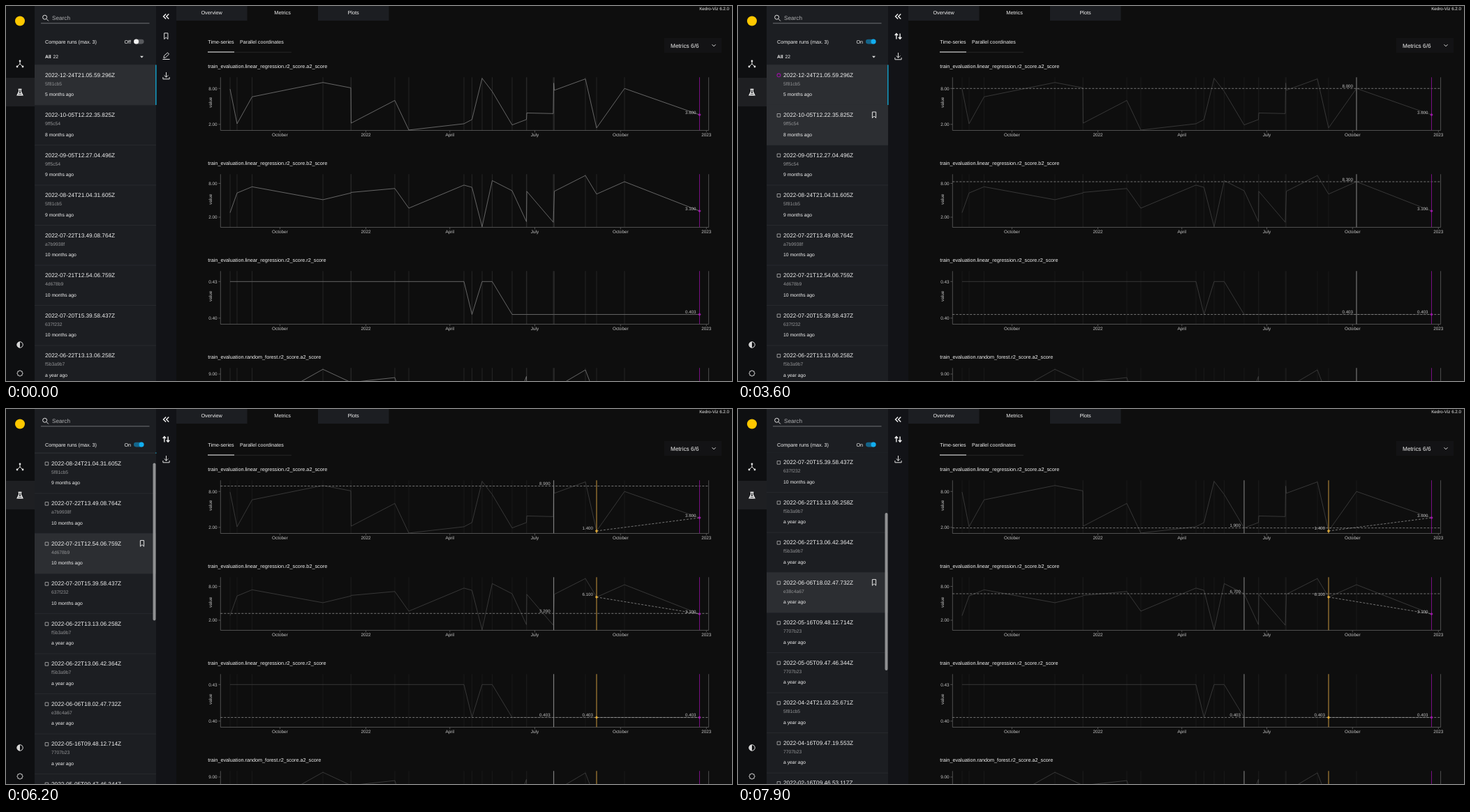
These frames come from a looping animation (1040 by 538 pixels, 8000 ms). An HTML page:

```html
<!DOCTYPE html>
<html lang="en">
<head>
<meta charset="utf-8">
<title>Experiment runs</title>
<style>
html, body { margin: 0; width: 100%; height: 100%; overflow: hidden; background: #0e0e0e; }
svg { display: block; width: 100vw; height: 100vh; }
text { font-family: "Liberation Sans", Arial, sans-serif; text-rendering: geometricPrecision; fill: #f2f2f2; }
.icon { fill: none; stroke: #e2e2e2; stroke-width: 1; }
.icon.bold { stroke: #f4f4f4; stroke-width: 1.35; }
.axis { fill: none; stroke: #606060; stroke-width: .8; }
.tick { font-size: 6.4px; fill: #c4c4c4; }
.value { font-size: 6.2px; fill: #c0c0c0; text-anchor: end; }
.trend { fill: none; stroke: #7c7c7c; stroke-width: .8; }
.run { stroke: #2d2d2d; stroke-width: .8; }
.dim .trend { stroke: #424242; }
.dim .run { stroke: #1c1c1c; }
.dash { fill: none; stroke: #a0a0a0; stroke-width: .7; stroke-dasharray: 3 2; }
</style>
</head>
<body>
<svg id="stage" viewBox="0 0 1040 538" xmlns="http://www.w3.org/2000/svg"></svg>
<script>
const LOOP = 8000, ROW = 57.5, LIST_TOP = 84.5;
const PURPLE = '#780e83', YELLOW = '#c4933a', GREY = '#858585';

const runs = `2022-12-24T21.05.59.296Z 5f81cb5 5 months
2022-10-05T12.22.35.825Z 9ff5c54 8 months
2022-09-05T12.27.04.496Z 9ff5c54 9 months
2022-08-24T21.04.31.605Z 5f81cb5 9 months
2022-07-22T13.49.08.764Z a7b9938f 10 months
2022-07-21T12.54.06.759Z 4d678b9 10 months
2022-07-20T15.39.58.437Z 637f232 10 months
2022-06-22T13.13.06.258Z f5b3a9b7 a year
2022-06-22T13.06.42.364Z f5b3a9b7 a year
2022-06-06T18.02.47.732Z e38c4a67 a year
2022-05-16T09.48.12.714Z 7707b23 a year
2022-05-05T09.47.46.344Z 7707b23 a year
2022-04-24T21.03.25.671Z 5f81cb5 a year
2022-04-16T09.47.19.553Z 7707b23 a year
2022-02-16T09.46.53.117Z 7707b23 a year`.split('\n').map(line => {
  const [name, hash, ...age] = line.split(' ');
  return { name, hash, age: age.join(' ') + ' ago' };
});

// Run positions on the time axis, oldest first.
const xs = [321, 331, 352.5, 454, 494, 494.4, 557, 577, 656, 667.5, 682,
  696.5, 725, 745.5, 746, 784, 784.6, 785.5, 830, 846, 886, 993.5];
const last = xs.length - 1;
const SECOND_ROW = 2;

// ticks: [label, y offset from the top of the plot]
const charts = [
  { title: 'linear_regression.r2_score.a2_score', ticks: [['8.00', 16], ['2.00', 67.5]], base: 8, unit: 8.58,
    data: [7.9, 2.1, 6.6, 9, 8.1, 2.2, 6, 1.05, 2.1, 2.8, 9.7, 7.5, 1.9, 2.8, 3.9, 3.8, 8.9, 7.7, 9.6, 1.4, 8, 3.6] },
  { title: 'linear_regression.r2_score.b2_score', ticks: [['8.00', 13.2], ['2.00', 61.7]], base: 8, unit: 8.08,
    data: [2.8, 6.3, 7.4, 5.1, 6.3, 6.4, 7.1, 3.6, 7.7, 7.3, .3, 8.5, 6.7, 1.2, 6.6, 1.1, 3.2, 6.6, 9.4, 6.1, 8.3, 3.1] },
  { title: 'linear_regression.r2_score.r2_score', ticks: [['0.43', 15], ['0.40', 67.5]], base: .43, unit: 1750,
    data: xs.map((x, i) => i < 9 || i === 10 || i === 11 ? .43 : .403) },
  { title: 'random_forest.r2_score.a2_score', ticks: [['9.00', 8.7]], base: 9, unit: 8.5,
    data: [2, 2.5, 3.1, 9.8, 7.6, 7.6, 8.4, 1, 2, 3, 4, 5, 2, 8.6, 2, 3, 3, 6.6, 9.7, 4.7, 4, 3] }
];
charts.forEach((c, i) => {
  c.top = 102.3 + 139 * i;
  c.y = k => c.top + c.ticks[0][1] + (c.base - c.data[k]) * c.unit;
});

const text = (x, y, size, str, attrs = '') => `<text x="${x}" y="${y}" font-size="${size}" ${attrs}>${str}</text>`;
const rect = (x, y, w, h, fill, attrs = '') => `<rect x="${x}" y="${y}" width="${w}" height="${h}" fill="${fill}" ${attrs}/>`;
const line = (x1, y1, x2, y2, attrs) => `<line x1="${x1}" y1="${y1}" x2="${x2}" y2="${y2}" ${attrs}/>`;
const icon = (x, y, d, kind = '') => `<path class="icon ${kind}" transform="translate(${x} ${y})" d="${d}"/>`;

const BOOKMARK = 'M-2.6-4.3H2.6V4.3L0 1.8L-2.6 4.3Z';
const DOWNLOAD = 'M0-5V2.2M-2.8-.6L0 2.2L2.8-.6M-4.6 2V4.8H4.6V2';
const SORT = 'M-2.6 4V-3.6M-4.8-1.4L-2.6-3.8L-.4-1.4M2.6-4V3.6M.4 1.4L2.6 3.8L4.8 1.4';
const PENCIL = 'M-3.6 3L-3-.2L2-4.6L4-2.4L-1 2.4ZM-5 5H5';
const CHEVRONS = 'M-.4-3.6L-4 0L-.4 3.6M3.8-3.6L.2 0L3.8 3.6';
const GEAR = 'M0-4.2L1.4-3.2L3-3L3.2-1.4L4.2 0L3.2 1.4L3 3L1.4 3.2L0 4.2L-1.4 3.2L-3 3L-3.2 1.4L-4.2 0L-3.2-1.4L-3-3L-1.4-3.2Z';

function navBar() {
  return rect(0, 0, 41, 538, '#0e0f11') + rect(0, 103, 41, 41, '#1e1f22') +
    `<circle cx="20" cy="21.5" r="7" fill="#ffc800"/>` +
    icon(20, 83, 'M0-3V0L-3.6 3.6M0 0L3.6 3.6') +
    [[20, 79], [16, 87], [24, 87]].map(([x, y]) => `<circle cx="${x}" cy="${y}" r="1.4" fill="#e2e2e2"/>`).join('') +
    icon(20, 123.5, 'M-2.4-4.2H2.4M-1.3-4V-.8L-3.8 4.2H3.8L1.3-.8V-4M-2.6 2H2.6', 'bold') +
    `<circle class="icon" cx="20" cy="486" r="4.2"/><path d="M20 481.8A4.2 4.2 0 0 0 20 490.2Z" fill="#d8d8d8"/>` +
    icon(20, 527, GEAR);
}

function runRow(run, i) {
  const y = LIST_TOP + ROW * i;
  return `<g class="row">` +
    rect(41, y, 174, ROW, '#2c2e32', 'class="bg"') +
    line(41, y + ROW, 215, y + ROW, 'stroke="#2a2c30" stroke-width=".8"') +
    rect(214, y, 1.6, ROW, '#1593b8', 'class="bar"') +
    `<g class="label">` + text(56, y + 17.2, 8.22, run.name) +
    text(56, y + 29.4, 6.75, run.hash, 'style="fill:#939496"') +
    text(56, y + 44.7, 6.77, run.age) + `</g>` +
    `<path class="box" transform="translate(58.4 ${y + 14.8})" d="M-2.3-2.3H2.3V2.3H-2.3Z" fill="none" stroke="#b5b5b5" stroke-width=".8"/>` +
    `<circle class="mark" cx="58.4" cy="${y + 14.8}" r="2.4" fill="none" stroke-width="1.1" stroke="${i ? '#e8b422' : '#96129f'}"/>` +
    icon(195, y + 14.3, BOOKMARK, 'save') + `</g>`;
}

function sidePanel() {
  return rect(41, 0, 174, 538, '#1c1e22') +
    `<circle class="icon" cx="55.6" cy="16.2" r="3"/>` + icon(59.4, 20, 'M-1.5-1.5L1.5 1.5') +
    text(66, 20.4, 8.2, 'Search', 'style="fill:#b0b1b3"') +
    line(50, 24.8, 205.5, 24.8, 'stroke="#85868a" stroke-width=".8"') +
    text(56, 53.6, 7.2, 'Compare runs (max. 3)') +
    text(179, 53.6, 7.2, 'Off', 'id="state" text-anchor="end"') +
    rect(183, 47.8, 14.6, 6.6, '#57595d', 'id="track" rx="3.3"') +
    `<circle id="knob" cy="51.1" r="3.5"/>` +
    `<g clip-path="url(#listClip)"><g id="list">` +
    text(56, 75.4, 6.8, 'All', 'font-weight="bold"') + text(67.5, 75.4, 6.7, '22') +
    `<path d="M192 71.8H197L194.5 74.4Z" fill="#ddd"/>` +
    line(41, LIST_TOP, 215, LIST_TOP, 'stroke="#2a2c30" stroke-width=".8"') +
    runs.map(runRow).join('') + `</g></g>`;
}

function actionBar() {
  return rect(215, 0, 29, 538, '#121317') + icon(229.5, 15, CHEVRONS, 'bold') +
    `<g id="single">` + icon(229.3, 43.2, BOOKMARK) + icon(229.5, 71.5, PENCIL) + icon(229.5, 100, DOWNLOAD) + `</g>` +
    `<g id="compare">` + icon(229.5, 43.4, SORT, 'bold') + icon(229.5, 72, DOWNLOAD) + `</g>`;
}

function header() {
  const tab = (x, label, on) => (on ? '' : rect(x, 0, 101.5, 21, '#1c1e22')) +
    text(x + 50.6, 12.2, 7.3, label, 'text-anchor="middle"');
  return tab(244, 'Overview') + tab(345.5, 'Metrics', true) + tab(447, 'Plots') +
    text(1036, 5.6, 6.24, 'Kedro-Viz 6.2.0', 'text-anchor="end"') +
    text(289.3, 54, 7.2, 'Time-series') + text(335, 54, 7.17, 'Parallel coordinates') +
    line(289, 66.3, 409, 66.3, 'stroke="#2b2b2b" stroke-width=".8"') +
    line(289, 66, 327, 66, 'stroke="#eee" stroke-width="1.2"') +
    rect(943, 46, 82, 21, '#131315') + text(952, 59.6, 8.3, 'Metrics 6/6') +
    icon(1014, 56.5, 'M-2.5-1.2L0 1.3L2.5-1.2');
}

// Vertical line, point and value label of a picked run.
function picked(c, k, color, point) {
  const x = xs[k], y = c.y(k);
  return line(x, c.top, x, c.top + 76, `stroke="${color}" stroke-width="1"`) +
    (point ? `<path d="M${x - 2.2} ${y}L${x} ${y - 2.2}L${x + 2.2} ${y}L${x} ${y + 2.2}Z" fill="${point}"/>` : '') +
    `<text class="value" x="${x - 5}" y="${y - 1.5}">${c.data[k].toFixed(3)}</text>`;
}

function chart(c) {
  const { top } = c, bottom = top + 76.2, k = last - SECOND_ROW;
  const months = [['October', 392.4], ['2022', 515.5], ['April', 635.8], ['July', 757.5], ['October', 880.3], ['2023', 1003.3]];
  return text(289.3, top - 12.9, 7.26, 'train_evaluation.' + c.title) +
    xs.map(x => line(x, top, x, bottom, 'class="run"')).join('') +
    `<path class="axis" d="M307.3 ${top}V${bottom}H1006.6V${top}"/>` +
    c.ticks.map(([label, dy]) => line(304.3, top + dy, 307.3, top + dy, 'class="axis"') +
      text(302.6, top + dy + 2.3, 6.4, label, 'class="tick" text-anchor="end"')).join('') +
    months.map(([label, x]) => line(x, bottom, x, bottom + 3, 'class="axis"') +
      text(x, top + 85, 6.4, label, 'class="tick" text-anchor="middle"')).join('') +
    `<text class="tick" text-anchor="middle" transform="translate(295 ${top + 36}) rotate(-90)">value</text>` +
    `<polyline class="trend" points="${xs.map((x, j) => x + ',' + c.y(j)).join(' ')}"/>` +
    `<g class="hover"></g><g class="second">` +
    `<path class="dash" d="M${xs[k]} ${c.y(k)}L${xs[last]} ${c.y(last)}"/>` +
    picked(c, k, YELLOW, '#dca838') + `</g>` + picked(c, last, PURPLE, '#9a18a6');
}

const stage = document.getElementById('stage');
stage.innerHTML = `<defs><clipPath id="listClip"><rect x="41" y="62.5" width="176" height="476"/></clipPath></defs>` +
  rect(0, 0, 1040, 538, '#0e0e0e') + navBar() + actionBar() + sidePanel() + header() +
  `<g id="charts">${charts.map(chart).join('')}</g>` +
  rect(210.5, 0, 4, 226, '#8f9092', 'id="thumb" rx="2"');

const $ = id => document.getElementById(id);
const all = sel => [...stage.querySelectorAll(sel)];
const show = (el, on) => el.setAttribute('visibility', on ? 'visible' : 'hidden');
const rows = all('.row').map(el => Object.fromEntries(
  ['bg', 'bar', 'label', 'box', 'mark', 'save'].map(name => [name, el.querySelector('.' + name)])));
const hoverLayers = all('.hover'), secondLayers = all('.second');

const clamp = v => Math.max(0, Math.min(1, v));
const ramp = (t, from, to) => clamp((t - from) / (to - from));
const glide = (t, from, to, dist) => dist * (1 - (1 - ramp(t, from, to)) ** 1.5);
const scrollAt = t => glide(t, 5300, 6200, 193.4) + glide(t, 6200, 6800, 72) + glide(t, 7100, 7900, 102);

// [start, hovered row]
const hovers = [[0, -1], [3500, 0], [3600, 1], [3800, 2], [6100, 5], [6700, 7], [7800, 9]];

function drawHover(row, selected) {
  const k = last - row;
  hoverLayers.forEach((layer, i) => {
    const c = charts[i];
    layer.innerHTML = row < 0 ? '' :
      line(307.3, c.y(k), 1006.6, c.y(k), 'class="dash"') + (selected(row) ? '' : picked(c, k, GREY));
  });
}

function render(t) {
  const on = t >= 2500;
  const slide = ramp(t, 2500, 2800);
  const hover = hovers.filter(h => h[0] <= t).pop()[1];
  const scroll = scrollAt(t);
  const selected = row => row === 0 || (row === SECOND_ROW && t >= 4700);

  $('state').textContent = on ? 'On' : 'Off';
  $('track').setAttribute('fill', !on ? '#57595d' : slide < .3 ? '#4a6270' : '#14658a');
  $('knob').setAttribute('cx', 186.6 + 7.4 * slide);
  $('knob').setAttribute('fill', on ? '#12aef0' : '#f2f2f2');
  show($('single'), !on);
  show($('compare'), on);
  $('compare').setAttribute('opacity', .14 + .86 * slide);
  $('compare').setAttribute('transform', `translate(${-9 * (1 - slide)} 0)`);

  rows.forEach((r, i) => {
    show(r.bg, selected(i) || i === hover);
    show(r.bar, selected(i));
    show(r.box, on && !selected(i));
    show(r.mark, on && selected(i));
    show(r.save, i === hover);
    r.label.setAttribute('transform', `translate(${on ? 9 : 0} 0)`);
  });
  $('list').setAttribute('transform', `translate(0 ${-scroll})`);
  show($('thumb'), scroll > 0);
  $('thumb').setAttribute('y', .4116 * scroll - 2.2);

  $('charts').setAttribute('class', hover >= 0 ? 'dim' : '');
  drawHover(hover, selected);
  secondLayers.forEach(el => el.setAttribute('opacity', ramp(t, 4600, 4900)));
}

let shown = -1;
function tick(now) {
  const t = Math.floor(now % LOOP / 100) * 100;
  if (t !== shown) render(shown = t);
  requestAnimationFrame(tick);
}
render(0);
requestAnimationFrame(tick);
</script>
</body>
</html>
```
